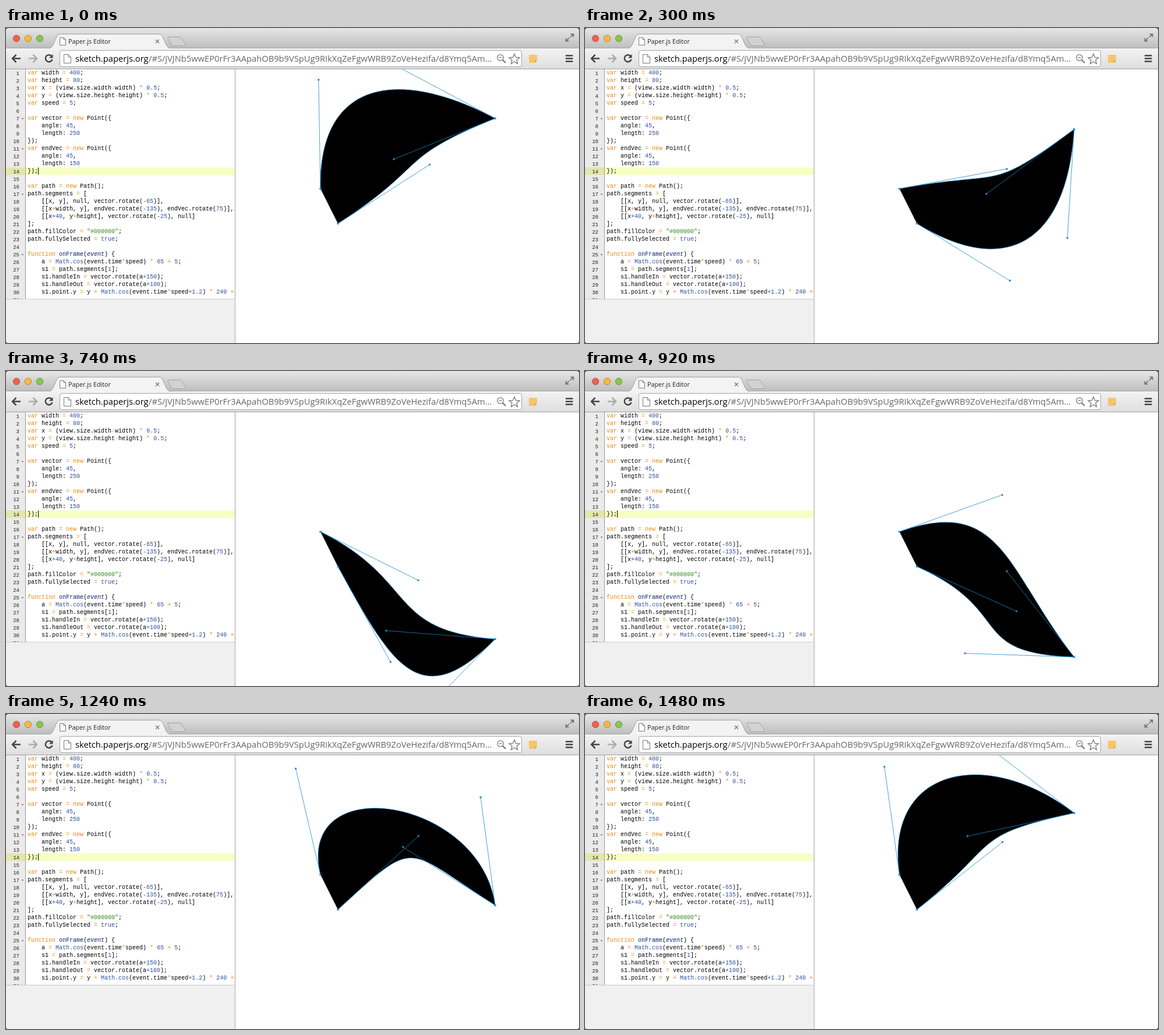
Animation, 984 px wide and 542 px high, one loop 1500 ms. Source, as an HTML page:

```html
<!DOCTYPE html>
<html lang="en">
<head>
<meta charset="utf-8">
<title>Paper.js Editor</title>
<style>
  html, body { margin: 0; width: 100%; height: 100%; overflow: hidden; background: #fff; }
  svg { display: block; }
  text { white-space: pre; }
  .ui { font-family: "Open Sans", "Noto Sans", sans-serif; }
  #code { font: 10px "Liberation Mono", "DejaVu Sans Mono", monospace; }
  #numbers { font: 9px "Liberation Mono", monospace; text-anchor: end; fill: #222; }
  .key { fill: #e98a10; }
  .num { fill: #2c519e; }
  .str { fill: #2f8a1a; }
  .name { fill: #0b1d6b; }
  .arg { fill: #0b1d6b; font-style: italic; }
  .line { fill: none; stroke: #1a88cc; stroke-width: .8; }
</style>
</head>
<body>
<svg width="984" height="542" viewBox="0 0 984 542">
  <defs>
    <linearGradient id="bar" x2="0" y2="1"><stop stop-color="#e6e6e6"/><stop offset="1" stop-color="#bcbcbc"/></linearGradient>
    <linearGradient id="tools" x2="0" y2="1"><stop stop-color="#f3f3f3"/><stop offset="1" stop-color="#dedede"/></linearGradient>
    <clipPath id="editor"><path d="M0 71H392V466H0z"/></clipPath>
    <clipPath id="stage"><path d="M395 71H984V542H395z"/></clipPath>
  </defs>

  <!-- window and tabs -->
  <path d="M0 0H984V36H0z" fill="url(#bar)"/>
  <path d="M0 35H984V70H0z" fill="url(#tools)"/>
  <path d="M0 34.5H76M280 34.5H984" stroke="#a2a2a2"/>
  <path d="M0 70.5H984" stroke="#a0a0a0"/>
  <path d="M74 35Q79 34 81 29L87 15Q89 10.500 93 10.500H262Q267 10.500 269 15L275 29Q277 34 282 35" fill="#f3f3f3" stroke="#a0a0a0"/>
  <path d="M279 15.500H298Q301 15.500 302 18L308 28Q309 30.500 306 30.500H288Q285 30.500 284 28L278 18Q277 15.500 279 15.500z" fill="#d2d2d2" stroke="#a3a3a3"/>
  <g stroke-opacity=".65">
    <circle cx="18" cy="18" r="5.700" fill="#f0604f" stroke="#963a30"/>
    <circle cx="38" cy="18" r="5.700" fill="#f8b83f" stroke="#966a20"/>
    <circle cx="58" cy="18" r="5.700" fill="#84c84e" stroke="#487a28"/>
  </g>
  <path d="M92.500 16.500H99L102.500 20V29.500H92.500zM99 16.500V20H102.500" fill="#fff" stroke="#777"/>
  <text class="ui" x="107" y="27" font-size="10.750" fill="#222">Paper.js Editor</text>
  <path d="M257 20L263 26M263 20L257 26" stroke="#777" stroke-width="1.400"/>
  <path d="M969.500 10.500H974.500V15.500M974 11L969 16M966.500 22.500H961.500V17.500M962 22L967 17" fill="none" stroke="#666" stroke-width="1.500"/>

  <!-- toolbar -->
  <g fill="none" stroke-width="2.500">
    <path d="M25 52.500H11.500M17.500 46L11 52.500L17.500 59" stroke="#444"/>
    <path d="M39 52.500H52.500M46.500 46L53 52.500L46.500 59" stroke="#aaa"/>
    <path d="M78.500 48.500A6 6 0 1 0 79.500 54" stroke="#444"/>
    <path d="M961 47.500H973.500M961 52.500H973.500M961 57.500H973.500" stroke="#444"/>
  </g>
  <path d="M80.500 45V51.500H74z" fill="#444"/>
  <rect x="92.500" y="38.500" width="793" height="28" rx="3.500" fill="#fff" stroke="#a6a6a6"/>
  <path d="M99.500 45.500H107L111.500 50V60.500H99.500zM107 45.500V50H111.500" fill="#fff" stroke="#777"/>
  <g class="ui" font-size="14.700">
    <text x="119" y="58">sketch.paperjs.org</text>
    <text x="245" y="58" fill="#666">/#S/jVJNb5wwEP0rFr3AApahOB9b9VSpUg9RIkXqZeFgwWRB9ZoVeHezifa/d8Ymq5Am…</text>
  </g>
  <g fill="none" stroke="#777" stroke-width="1.300">
    <circle cx="849" cy="51" r="5.200"/>
    <path d="M846.500 51H851.500"/>
    <path d="M853 55L858 60" stroke-width="2.300"/>
    <path d="M873 44.500L875.500 50.500L882 51L877 55L878.500 61.500L873 58L867.500 61.500L869 55L864 51L870.500 50.500z"/>
  </g>
  <path d="M898 46H912V56L908 60H898z" fill="#f7c56c"/>
  <path d="M908 60V56H912z" fill="#dc9f45"/>

  <!-- editor -->
  <path d="M0 71H33V466H0z" fill="#ebebeb"/>
  <path d="M0 240H33V253H0z" fill="#e3e6ad"/>
  <path d="M34 240H392V253H34z" fill="#f7ffc4"/>
  <path d="M33.500 71V466" stroke="#999"/>
  <path d="M0 467H392V542H0z" fill="#f0f0f0"/>
  <path d="M0 466.500H392" stroke="#c8c8c8"/>
  <path d="M392 71H395V542H392z" fill="#d9d9d9"/>
  <g clip-path="url(#editor)"><g id="numbers"></g><g id="code"></g></g>
  <path id="caret" d="M55.500 240V252" stroke="#000"/>

  <!-- sketch -->
  <g clip-path="url(#stage)">
    <path id="shape"/>
    <path id="outline" class="line"/>
    <path id="handles" class="line"/>
    <path id="knobs" fill="#1a88cc"/>
  </g>
  <path d="M0 0H4Q0 0 0 4zM984 0H980Q984 0 984 4zM0 542V539Q0 542 3 542zM984 542V539Q984 542 981 542z"/>
</svg>
<script>
const $ = id => document.getElementById(id);

const source = `var width = 400;
var height = 80;
var x = (view.size.width-width) * 0.5;
var y = (view.size.height-height) * 0.5;
var speed = 5;

var vector = new Point({
    angle: 45,
    length: 250
});
var endVec = new Point({
    angle: 45,
    length: 150
});

var path = new Path();
path.segments = [
    [[x, y], null, vector.rotate(-65)],
    [[x+width, y], endVec.rotate(-135), endVec.rotate(75)],
    [[x+40, y+height], vector.rotate(-25), null]
];
path.fillColor = "#000000";
path.fullySelected = true;

function onFrame(event) {
    a = Math.cos(event.time*speed) * 65 + 5;
    s1 = path.segments[1];
    s1.handleIn = vector.rotate(a+150);
    s1.handleOut = vector.rotate(a+100);
    s1.point.y = y + Math.cos(event.time*speed+1.2) * 240 + 
`.split('\n');

const tokens = /(?<str>"[^"]*")|(?<name>onFrame)|(?<arg>event(?=\)))|(?<num>(?:[+-]|\b)\d[\d.]*|\btrue\b|Math\.cos)|(?<key>\b(?:var|new|function)\b|[=*+-])/g;
const highlight = line => line.replace(tokens, (token, ...rest) => {
  const groups = rest.pop();
  const kind = Object.keys(groups).find(k => groups[k]);
  return `<tspan class="${kind}">${token}</tspan>`;
});

$('code').innerHTML = source.map((line, i) => `<text x="37" y="${80 + 13 * i}">${highlight(line)}</text>`).join('');
$('numbers').innerHTML = source.map((line, i) => {
  const y = 81 + 13 * i;
  const fold = /[{[]$/.test(line) ? `<path d="M26.500 ${y - 4}h4l-2 2.500z" fill="#777"/>` : '';
  return `<text x="23" y="${y}">${i + 1}</text>${fold}`;
}).join('');

const rad = Math.PI / 180;
const cos = degrees => Math.cos(degrees * rad);
const handle = ([x, y], angle) => [x + 187.5 * cos(angle), y + 187.5 * Math.sin(angle * rad)];
const square = ([x, y]) => `M${x - 1.6} ${y - 1.6}h3.2v3.2h-3.2z`;
const dot = ([x, y]) => `M${x - 1.7} ${y}a1.7 1.7 0 1 0 3.4 0a1.7 1.7 0 1 0 -3.4 0`;

function draw(now) {
  const time = Math.floor(now % 1500 / 20) * 20;
  const phase = 78.1 + 0.2406 * Math.max(time, 20);
  const a = 65 * cos(phase) + 5;
  const swing = cos(phase + 138.8);

  const start = [540, 276.5];
  const tip = [840, 314 + 180 * cos(phase + 68.75)];
  const end = [570, 336.5];
  const startOut = handle(start, 75 * swing - 35);
  const tipIn = handle(tip, a + 195);
  const tipOut = handle(tip, a + 145);
  const endIn = handle(end, 60 * swing + 12);

  const curve = `M${start}C${startOut} ${tipIn} ${tip}C${tipOut} ${endIn} ${end}`;
  $('shape').setAttribute('d', curve + 'z');
  $('outline').setAttribute('d', curve);
  $('handles').setAttribute('d', `M${start}L${startOut}M${tipIn}L${tip}L${tipOut}M${end}L${endIn}`);
  $('knobs').setAttribute('d', [start, tip, end].map(square).join('') + [startOut, tipIn, tipOut, endIn].map(dot).join(''));
  $('caret').style.opacity = time < 100 || time >= 690 && time < 1290 ? 1 : 0;
  requestAnimationFrame(draw);
}
draw(0);
</script>
</body>
</html>
```
